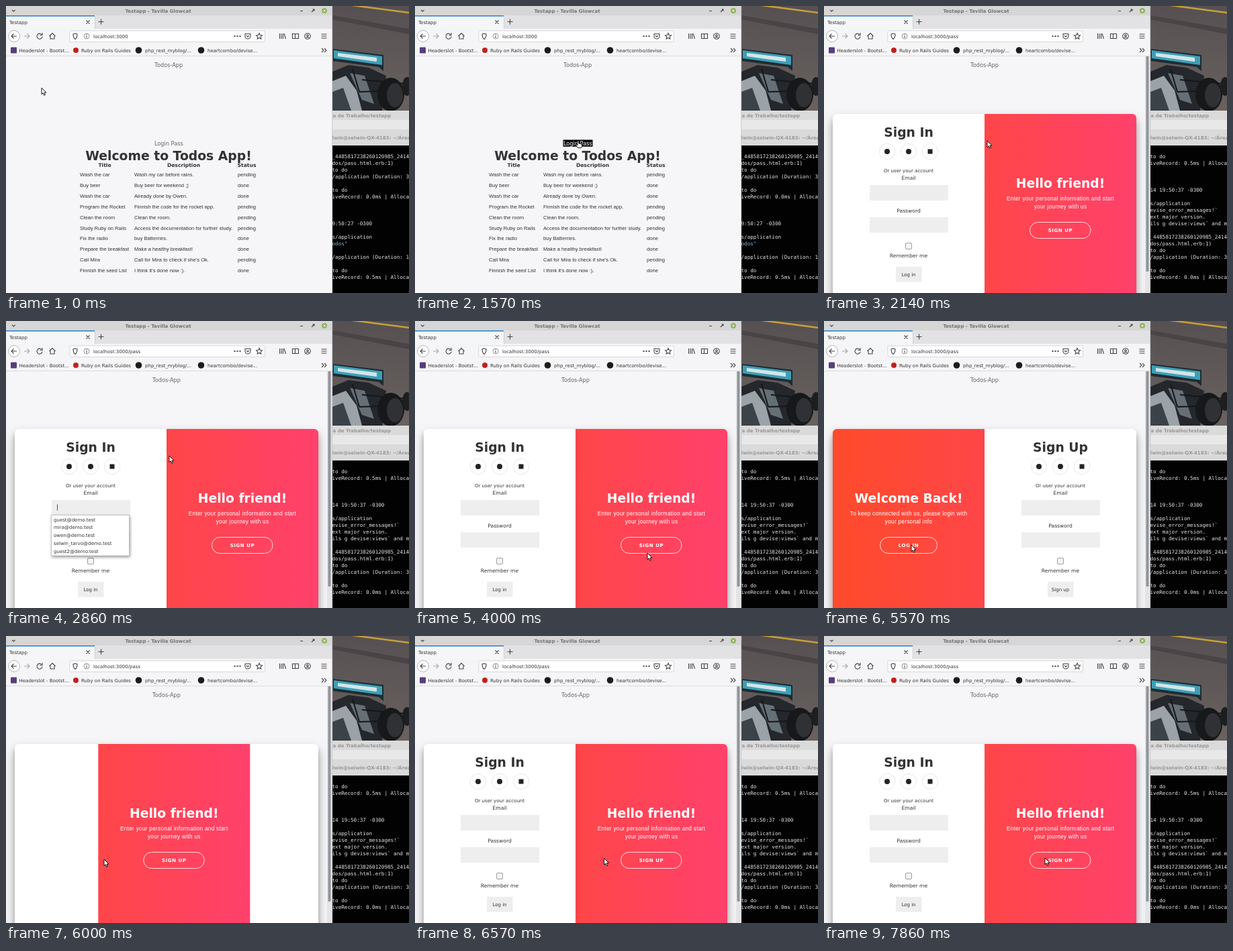
Recreate the animation shown at these times as an HTML page. Size 600 px wide and 428 px high, loop 8 s.

```html
<!DOCTYPE html>
<html lang="en">
<head>
<meta charset="utf-8">
<title>Todos app</title>
<style>
  html, body { margin: 0; height: 100%; overflow: hidden; }
  svg { display: block; width: 100vw; height: 100vh; font: 7.62px "DejaVu Sans", sans-serif; fill: #333; }
  text { white-space: pre; }
  .ui { font-size: 7.03px; }
  .b { font-weight: bold; }
  .h1 { font-size: 18.75px; font-weight: bold; }
  .nav { font-size: 8.2px; fill: #666; }
  .mid { text-anchor: middle; }
  .cells { font-family: "Liberation Sans", Arial, sans-serif; }
  .mono { font-family: "DejaVu Sans Mono", monospace; fill: #e6e6e6; }
  .lead { font: 8.2px "Liberation Sans", Arial, sans-serif; letter-spacing: .293px; }
  .pill { font-size: 7.03px; font-weight: bold; letter-spacing: .586px; }
  .icon { fill: none; stroke: #444; stroke-width: 1.1; }
  .card { fill: #fff; filter: drop-shadow(0 8px 8px #0004) drop-shadow(0 5px 3px #0003); }
  .popup { fill: #fff; stroke: #aaa; stroke-width: .6; filter: drop-shadow(1px 2px 2px #0006); }
</style>
</head>
<body>
<svg viewBox="0 0 600 428" preserveAspectRatio="none">
  <defs>
    <linearGradient id="warm"><stop stop-color="#ff4b2b"/><stop offset="1" stop-color="#ff4649"/></linearGradient>
    <linearGradient id="pink"><stop stop-color="#ff4649"/><stop offset="1" stop-color="#ff416c"/></linearGradient>
    <linearGradient id="road" x2="0" y2="1"><stop stop-color="#565052"/><stop offset="1" stop-color="#69625f"/></linearGradient>
    <clipPath id="cardClip"><rect x="13" y="161" width="452" height="300" rx="6"/></clipPath>
    <clipPath id="pageClip"><rect y="75" width="478" height="353"/></clipPath>
    <clipPath id="deskClip"><rect x="486" width="114" height="428"/></clipPath>
  </defs>

  <!-- desktop behind the browser -->
  <g clip-path="url(#deskClip)">
    <rect x="486" width="114" height="157" fill="url(#road)"/>
    <path d="M486 14L600 34V42L486 20Z" fill="#4a4446"/>
    <path d="M516-1L600 10" stroke="#c79f3b" stroke-width="2.6"/>
    <path d="M486 98L510 88 540 92 566 104 560 156H486Z" fill="#24272b"/>
    <path d="M486 112L506 104 522 126 530 156H486Z" fill="#9ba3a8"/>
    <path d="M486 128L502 122 514 156H486Z" fill="#3b4248"/>
    <path d="M512 100L534 104 548 146 530 140Z" fill="#656f76"/>
    <path d="M530 110L596 116M526 128L590 126M516 94L526 128" stroke="#15171a" stroke-width="2"/>
    <path d="M487 64L562 73V97L555 91 487 82Z" fill="#1e2b32"/>
    <path d="M488 66L560 75V88L488 78Z" fill="#3e9fb5"/>
    <path d="M494 70L552 77V83L494 75Z" fill="#d2e5e9"/>
    <ellipse cx="573" cy="132" rx="20" ry="25" fill="#17181a"/>
    <ellipse cx="579" cy="133" rx="12" ry="18" fill="#303134"/>
    <ellipse cx="597" cy="120" rx="7" ry="14" fill="#1d1e20"/>
    <rect x="486" y="156" width="114" height="53" fill="#dadada"/>
    <rect x="486" y="170" width="114" height="14" fill="#e8e8e8"/>
    <g class="ui b" fill="#989898">
      <text x="486.5" y="166">a de Trabalho/testapp</text>
      <text x="481" y="199">elwin@selwin-QX-4183: ~/Área</text>
    </g>
    <rect x="486" y="208" width="114" height="220" fill="#020202"/>
    <g id="logHome" class="mono"></g>
    <g id="logPass" class="mono"></g>
  </g>

  <!-- browser frame -->
  <rect width="486" height="428" fill="#f6f5f7"/>
  <rect width="486" height="14" fill="#d6d6d6"/>
  <text class="ui b" x="177.500" y="10" fill="#747474">Testapp - Tavilla Glowcat</text>
  <path class="icon" stroke="#888" d="M9 6l2.300 2 2.300-2M438 7.500h4M455 9l4-4m-2.500 0H459v2.500"/>
  <circle cx="474" cy="7" r="4" fill="#8fb45c"/>
  <path d="M472.500 5.500l3 3m0-3l-3 3" stroke="#fff"/>
  <rect y="14" width="486" height="20" fill="#e2e2e5"/>
  <rect y="14" width="132" height="20" fill="#f5f6f7"/>
  <rect y="14" width="132" height="1.500" fill="#2a7fd0"/>
  <path d="M132.500 15V34" stroke="#c4c4c8" stroke-width=".6"/>
  <text class="ui" x="5" y="26.500">Testapp</text>
  <path class="icon" d="M119.500 21.500l5 5m0-5l-5 5M137.500 23.500h8m-4-4v8"/>
  <rect y="34" width="486" height="40.500" fill="#f5f5f7"/>
  <path d="M0 74.500H486" stroke="#ccc" stroke-width=".6"/>
  <rect x="95" y="37" width="290.500" height="16.500" rx="1.500" fill="#fff" stroke="#c8c8cc" stroke-width=".7"/>
  <g class="icon">
    <circle cx="12" cy="45" r="8.500" fill="#fff" stroke="#999" stroke-width=".7"/>
    <path d="M16 45H8m3.500-3.500L8 45l3.500 3.500"/>
    <path stroke="#aaa" d="M27 45h8m-3.500-3.500L35 45l-3.500 3.500"/>
    <path d="M53 42.500a4 4 0 1 0 1 3M54 40v3.500h-3.500M64.500 45l4.500-4.500 4.500 4.500M66 44.500V49h6v-4.500"/>
    <path d="M103 41l3 1c0 4-1 6-3 7.500-2-1.500-3-3.500-3-7.500Z"/>
    <circle cx="120" cy="45" r="4" stroke="#777" stroke-width=".8"/>
    <path d="M120 44.500v3M120 42.300v1"/>
    <path stroke-width="2" stroke-dasharray="2 2" d="M339.500 45h10"/>
    <path d="M356 41.500h8v3.500a4 4 0 0 1-8 0ZM358 44l2 2 2-2"/>
    <path d="M377 40.500l1.300 3 3.200.3-2.400 2.200.7 3.200-2.800-1.700-2.800 1.700.7-3.200-2.400-2.200 3.200-.3Z"/>
    <path d="M407.500 41v8M410 41v8M412.500 41v8M414 41l2.500 8M426.500 41.500h9v7h-9ZM430.500 42v6"/>
    <circle cx="449" cy="45" r="4.300"/>
    <circle cx="449" cy="44" r="1.300"/>
    <path d="M446.500 47.500q2.500-2 5 0M469.500 42h8M469.500 45h8M469.500 48h8M470 63l3 3-3 3m4-6l3 3-3 3"/>
  </g>
  <text id="url" class="ui" x="130" y="47.700"></text>
  <rect x="7" y="61.500" width="9" height="9" rx="1" fill="#563d7c"/>
  <circle cx="104" cy="66" r="4" fill="#c5201c"/>
  <circle cx="197.500" cy="66" r="4.800" fill="#1b1b1b"/>
  <circle cx="290.500" cy="66" r="4.800" fill="#1b1b1b"/>
  <g class="ui">
    <text x="19.500" y="68.500">Headerslot - Bootst...</text>
    <text x="112" y="68.500">Ruby on Rails Guides</text>
    <text x="207" y="68.500">php_rest_myblog/...</text>
    <text x="300" y="68.500">heartcombo/devise...</text>
  </g>

  <!-- list page -->
  <g id="home">
    <text class="nav mid" x="242.300" y="91">Todos-App</text>
    <rect id="linkBox" x="220.500" y="199.500" width="44" height="10.200" fill="#000"/>
    <text id="link" class="nav mid" x="242.300" y="207.500">Login Pass</text>
    <text class="h1 mid" x="242" y="230.300">Welcome to Todos App!</text>
    <g class="b mid">
      <text x="147" y="239.500">Title</text>
      <text x="264.500" y="239.500">Description</text>
      <text x="358.500" y="239.500">Status</text>
    </g>
    <g id="cells" class="cells"></g>
  </g>

  <!-- login page -->
  <g id="pass">
    <g clip-path="url(#pageClip)">
      <text class="nav mid" x="239" y="91">Todos-App</text>
      <rect class="card" x="13" y="161" width="452" height="300" rx="6"/>
      <g clip-path="url(#cardClip)">
        <g id="form" class="mid">
          <text id="formTitle" class="h1" x="126" y="194.500"></text>
          <g fill="#fff" stroke="#ddd" stroke-width=".7">
            <circle cx="94" cy="217" r="11.600"/><circle cx="126" cy="217" r="11.600"/><circle cx="158" cy="217" r="11.600"/>
          </g>
          <g fill="#222">
            <circle cx="94" cy="217" r="4"/><circle cx="126" cy="217" r="4"/><rect x="154.500" y="213.500" width="7" height="7"/>
          </g>
          <text class="ui" x="126" y="248.300">Or user your account</text>
          <text x="126" y="258.700">Email</text>
          <path d="M68 267h117v23H68ZM68 315h117v23H68ZM107 389h38.500v22.500H107Z" fill="#eee"/>
          <text x="126" y="307.500">Password</text>
          <rect x="121.500" y="353.500" width="9" height="9" rx="1.500" fill="#f4f4f4" stroke="#888" stroke-width=".8"/>
          <text x="126" y="375">Remember me</text>
          <text id="formButton" class="ui" x="126" y="402.700"></text>
        </g>
        <g id="overlay">
          <g id="hello" class="mid" fill="#fff">
            <rect y="161" width="226" height="270" fill="url(#pink)"/>
            <text class="h1" x="113" y="271">Hello friend!</text>
            <text class="lead" x="113" y="290">Enter your personal information and start</text>
            <text class="lead" x="113" y="301.700">your journey with us</text>
            <rect x="67.500" y="322.500" width="90.500" height="24" rx="12" fill="none" stroke="#fff" stroke-width=".8"/>
            <text class="pill" x="113" y="337">SIGN UP</text>
          </g>
          <g id="welcome" class="mid" fill="#fff">
            <rect y="161" width="226" height="270" fill="url(#warm)"/>
            <text class="h1" x="113" y="271">Welcome Back!</text>
            <text class="lead" x="113" y="290">To keep connected with us, please login with</text>
            <text class="lead" x="113" y="301.700">your personal info</text>
            <rect x="70.500" y="322.500" width="85" height="24" rx="12" fill="none" stroke="#fff" stroke-width=".8"/>
            <text class="pill" x="113" y="337">LOG IN</text>
          </g>
        </g>
      </g>
    </g>
    <g id="suggest" class="ui">
      <path d="M76.500 273.500v9" stroke="#222" stroke-width=".8"/>
      <rect class="popup" x="67.500" y="289.500" width="116" height="60.500"/>
    </g>
    <rect x="478" y="75" width="7.500" height="353" fill="#e4e4e6"/>
    <rect x="479.500" y="75" width="4" height="321" rx="1" fill="#90959c"/>
  </g>
  <path d="M485.700 0V428" stroke="#b8b8b8" stroke-width=".7"/>

  <g id="pointer" fill="#fff" stroke="#000" stroke-width=".9" stroke-linejoin="round">
    <path id="arrow" d="M0 0V9.600L2.200 7.700 3.800 11.200 5.400 10.500 3.900 7.100H6.900Z"/>
    <path id="hand" d="M-1 .5Q0-.8 1 .5V4L5.500 5V8.500L4.500 10.500H-.5L-3.500 6.500-2.500 5.500-1 7Z"/>
  </g>
</svg>
<script>
const $ = id => document.getElementById(id);

function addText(parent, x, y, string, fill) {
  const node = document.createElementNS(parent.namespaceURI, 'text');
  node.setAttribute('x', x);
  node.setAttribute('y', y);
  if (fill) node.setAttribute('fill', fill);
  node.textContent = string;
  parent.append(node);
}

`Wash the car|Wash my car before rains.|pending
Buy beer|Buy beer for weekend ;)|done
Wash the car|Already done by Owen.|done
Program the Rocket|Finnish the code for the rocket app.|pending
Clean the room|Clean the room.|pending
Study Ruby on Rails|Access the documentation for further study.|pending
Fix the radio|buy Batterries.|done
Prepare the breakfast|Make a healthy breakfast!|done
Call Mira|Call for Mira to check if she's Ok.|pending
Finnish the seed List|I think it's done now :).|done`.split('\n').forEach((row, i) =>
  row.split('|').forEach((cell, c) => addText($('cells'), [110, 191, 345][c], 254.2 + i * 15.86, cell)));

// One line of log per row; empty entries are blank rows.
const render = '_4485817238260120985_2414|dos/pass.html.erb:1)|to do|/application (Duration: 3||to do|iveRecord: 0.0ms | Alloca'
  .replace(' | ', ' ¦ ');
const logs = {
  logHome: render + '||||9:50:27 -0300||s/application|odos"||/application (Duration: 1||to do|iveRecord: 0.5ms ¦ Alloca',
  logPass: 'to do|iveRecord: 0.5ms ¦ Alloca||||14 19:50:37 -0300||s/application|evise_error_messages!`|ext major version.|ils g devise:views` and m||' + render
};
for (const [id, log] of Object.entries(logs))
  log.split('|').forEach((line, i) =>
    addText($(id), 485.5, 226.7 + i * 10, line.replace('¦', '|'), line === 'odos"' ? '#7fb4d8' : ''));

['guest@demo.test', 'mira@demo.test', 'owen@demo.test', 'selwin_tarvo@demo.test', 'guest2@demo.test']
  .forEach((mail, i) => addText($('suggest'), 71, 298.6 + i * 11.75, mail));

// Pointer stops: time, x, y
const stops = [
  [0, 53, 122], [140, 53, 122], [1290, 243, 201], [2857, 243, 201], [3714, 346, 346], [4000, 346, 346],
  [4571, 340, 338], [4857, 340, 338], [5571, 130, 334], [5714, 132, 334], [6000, 146, 333], [6857, 329, 331], [8000, 329, 331]
];
const OPEN = 4576, CLOSE = 5680, SLIDE = 600;

const ease = u => (u = Math.min(1, Math.max(0, u)), u * u * (3 - 2 * u));
const show = (id, visible) => $(id).style.display = visible ? '' : 'none';
const move = (id, x, y = 0) => $(id).setAttribute('transform', `translate(${x} ${y})`);

function pointerAt(t) {
  const i = stops.findIndex(stop => stop[0] > t);
  const [t0, x0, y0] = stops[i - 1], [t1, x1, y1] = stops[i];
  const k = ease((t - t0) / (t1 - t0));
  return [x0 + (x1 - x0) * k, y0 + (y1 - y0) * k];
}

function draw(t) {
  const onPass = t >= 2140;
  for (const id of ['pass', 'logPass']) show(id, onPass);
  for (const id of ['home', 'logHome']) show(id, !onPass);
  $('url').textContent = 'localhost:3000' + (onPass ? '/pass' : '');
  show('suggest', t >= 2280 && t < 3280);

  const [x, y] = pointerAt(t);
  const hover = !onPass && x > 221 && y > 199;
  move('pointer', x, y);
  show('hand', hover);
  show('arrow', !hover);
  show('linkBox', hover);
  $('link').style.fill = hover ? '#fff' : '';

  const p = t < CLOSE ? ease((t - OPEN) / SLIDE) : 1 - ease((t - CLOSE) / SLIDE);
  const welcome = t >= OPEN && t < CLOSE;
  show('welcome', welcome);
  show('hello', !welcome);
  move('overlay', 239 - 226 * p);
  move('form', 226 * p);
  $('formTitle').textContent = p > .5 ? 'Sign Up' : 'Sign In';
  $('formButton').textContent = p > .5 ? 'Sign up' : 'Log in';
}

function tick() {
  const step = Math.floor(performance.now() * .007 + .05) % 56;
  draw(step * 1000 / 7);
  requestAnimationFrame(tick);
}
tick();
</script>
</body>
</html>
```
